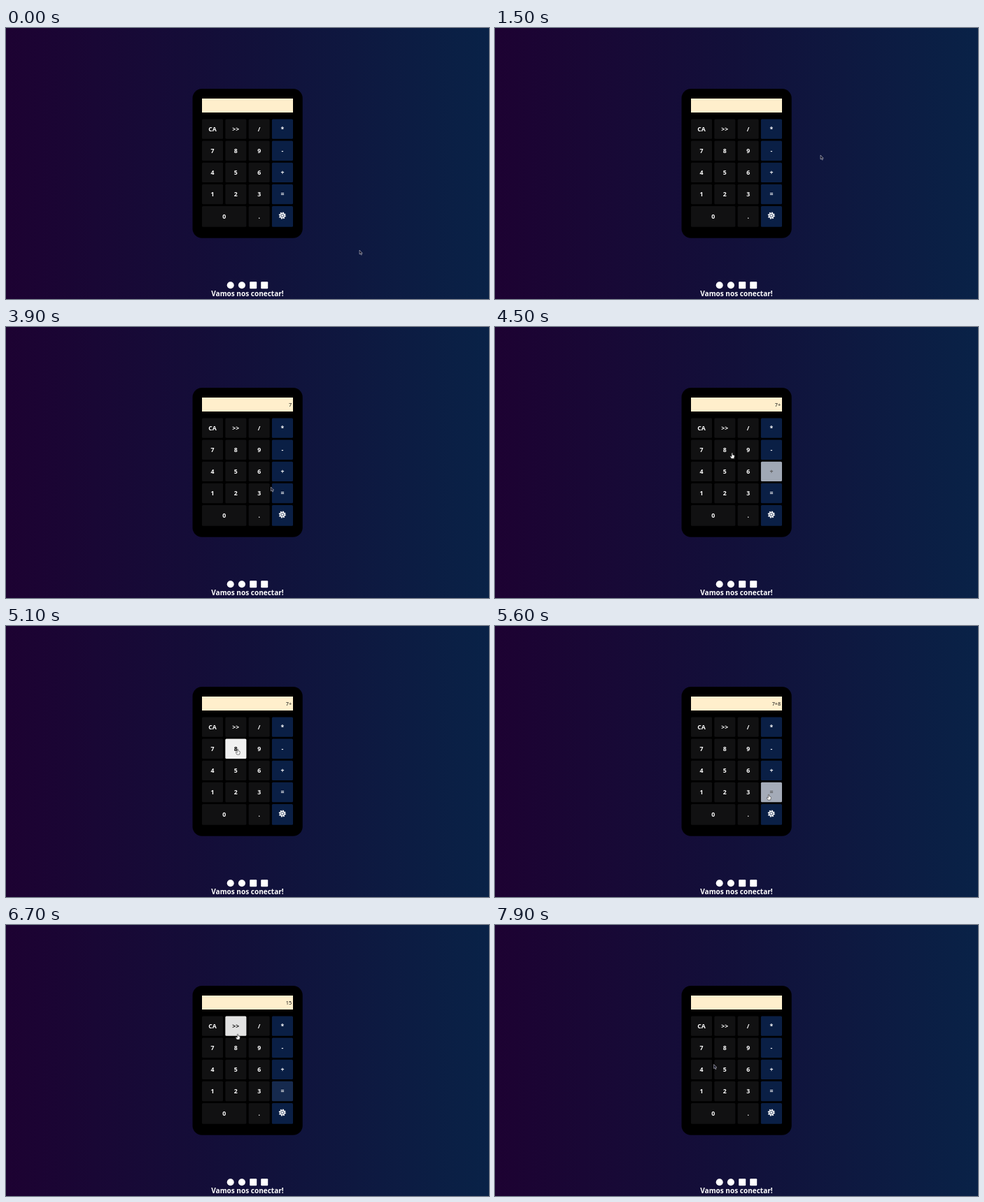
These frames come from a looping animation (690x388 px, 8000 ms). An HTML page:

```html
<!DOCTYPE html>
<html lang="pt-BR">
<head>
<meta charset="utf-8">
<title>Calculadora</title>
<style>
  html, body { margin: 0; width: 100%; height: 100%; overflow: hidden; background: #12103a; }
  svg { display: block; width: 100vw; height: 100vh; }
  text { font-family: Ubuntu, "Noto Sans", "Open Sans", sans-serif; text-anchor: middle; }
  .key text { font-size: 8.7px; font-weight: 600; }
  #out { font-size: 7.3px; text-anchor: end; fill: #111; }
  #call { font-size: 10.05px; font-weight: 600; fill: #fff; }
</style>
</head>
<body>
<svg viewBox="0 0 690 388">
  <defs>
    <linearGradient id="sky">
      <stop offset="0" stop-color="#1d0232"/>
      <stop offset=".5" stop-color="#12103a"/>
      <stop offset="1" stop-color="#092247"/>
    </linearGradient>
  </defs>
  <rect width="690" height="388" fill="url(#sky)"/>
  <rect x="266.5" y="87" width="157.2" height="213.8" rx="13.5"/>
  <rect x="280" y="101" width="130" height="20" fill="#ffefcc"/>
  <text id="out" x="408.2" y="113.6"></text>
  <g id="keys"></g>
  <g fill="#fff">
    <circle cx="320.7" cy="368.3" r="5"/>
    <circle cx="336.9" cy="368.3" r="5"/>
    <rect x="348.2" y="363.3" width="10" height="10" rx="1"/>
    <rect x="364.2" y="363.3" width="10" height="10" rx="1"/>
  </g>
  <text id="call" x="345" y="384.3">Vamos nos conectar!</text>
  <g id="cursor">
    <path id="arrow" d="M0 0V6L1.4 4.8L2.4 7L3.4 6.5L2.4 4.4H4.2Z" fill="#15152a" stroke="#d4d4dc" stroke-width=".55"/>
    <path id="hand" d="M-.7 .5Q0 -.5 .7 .5V2.8L3 3.5Q3.5 3.8 3.3 4.8L2.6 8H-1.2L-2.9 5Q-2.6 4-1.6 4.7L-.7 5.4Z" fill="#fff" stroke="#333" stroke-width=".6"/>
    <path id="beam" d="M-1.6 -4H1.6M0 -4V4M-1.6 4H1.6" fill="none" stroke="#333" stroke-width=".7"/>
  </g>
</svg>
<script>
const LOOP = 8000, STEP = 100, FADE_IN = 150, FADE_OUT = 200;
const NS = "http://www.w3.org/2000/svg";
const $ = id => document.getElementById(id);
const clamp = k => Math.min(1, Math.max(0, k));
const smooth = k => k * k * (3 - 2 * k);
const mix = (a, b, k) => `rgb(${a.map((v, i) => Math.round(v + (b[i] - v) * k))})`;
const inside = (x, y, b) => x >= b.x && x <= b.x + b.w && y >= b.y && y <= b.y + b.h;

const DARK = [17, 17, 18], BLUE = [10, 31, 69], LIGHT = [241, 241, 241];
const WHITE = [255, 255, 255], BLACK = [0, 0, 0];
const screenBox = { x: 280, y: 101, w: 130, h: 20 };

function add(parent, tag, attrs) {
  const el = document.createElementNS(NS, tag);
  for (const name in attrs) el.setAttribute(name, attrs[name]);
  return parent.appendChild(el);
}

function addGear(g, x, y) {
  const icon = add(g, "g", { transform: `translate(${x} ${y})`, fill: "none", stroke: "#fff" });
  add(icon, "circle", { r: 4.3, "stroke-width": 1.5, "stroke-dasharray": 4.3 * Math.PI / 8 });
  add(icon, "circle", { r: 3.8, fill: "#fff", stroke: "none" });
  add(icon, "circle", { r: 2, stroke: `rgb(${BLUE})`, "stroke-width": .8 });
}

// Keypad: a space marks the cell covered by the wide zero
const keys = [];
["C>/*", "789-", "456+", "123=", "0 .g"].forEach((row, r) => [...row].forEach((id, c) => {
  if (id === " ") return;
  const x = 280 + c * 33.3, y = 130.4 + r * 31.15;
  const w = id === "0" ? 63.4 : 30.1, h = r === 4 ? 29.8 : 28.4;
  const g = add($("keys"), "g", { class: "key" });
  const key = { x, y, w, h, base: c === 3 ? BLUE : DARK };
  key.rect = add(g, "rect", { x, y, width: w, height: h, rx: 1.5 });
  if (id === "g") addGear(g, x + w / 2 - .2, y + 13.6);
  else {
    key.text = add(g, "text", { x: x + w / 2, y: y + h / 2 + 3.2 });
    key.text.textContent = { C: "CA", ">": ">>" }[id] || id;
  }
  keys.push(key);
}));

// Pointer rests: arrival, departure, x, y
const rests = [
  [0, 500, 505, 318],
  [1100, 1200, 471, 193],
  [1500, 1500, 465, 182],
  [2100, 2100, 377, 105],
  [2600, 3400, 306, 174.5],
  [3900, 3900, 378.4, 229],
  [4100, 4430, 393, 210],
  [4520, 5210, 331, 176],
  [5500, 6510, 391, 241],
  [6560, 6710, 331, 156],
  [6900, 7700, 300, 146],
  [7900, LOOP, 312.6, 199.6]
].map(([from, to, x, y]) => ({ from, to, x, y }));

const entries = [[0, ""], [3300, "7"], [4300, "7+"], [5200, "7+8"], [6000, "15"], [7600, ""]];

function pointer(t) {
  const i = rests.findIndex(r => t <= r.to), b = rests[i], a = rests[i - 1] || b;
  const k = t >= b.from ? 1 : smooth((t - a.to) / (b.from - a.to));
  return [a.x + (b.x - a.x) * k, a.y + (b.y - a.y) * k];
}

// A key lights up while the pointer rests on it
function glow(key, t) {
  const rest = rests.find(r => inside(r.x, r.y, key));
  if (!rest) return 0;
  return Math.min(clamp((t - rest.from) / FADE_IN), 1 - clamp((t - rest.to) / FADE_OUT));
}

function draw(t) {
  for (const key of keys) {
    const level = glow(key, t);
    key.rect.setAttribute("fill", mix(key.base, LIGHT, level));
    if (key.text) key.text.setAttribute("fill", mix(WHITE, BLACK, level));
  }
  $("out").textContent = entries.filter(e => e[0] <= t).pop()[1];

  const [x, y] = pointer(t);
  const kind = keys.some(k => inside(x, y, k)) ? "hand"
    : inside(x, y, screenBox) ? "beam" : "arrow";
  for (const id of ["arrow", "hand", "beam"]) $(id).style.display = id === kind ? "" : "none";
  $("cursor").setAttribute("transform", `translate(${x} ${y})`);
}

const start = performance.now();
function tick() {
  const t = (performance.now() - start) % LOOP;
  draw(Math.floor(t / STEP) * STEP);
  requestAnimationFrame(tick);
}
tick();
</script>
</body>
</html>
```
